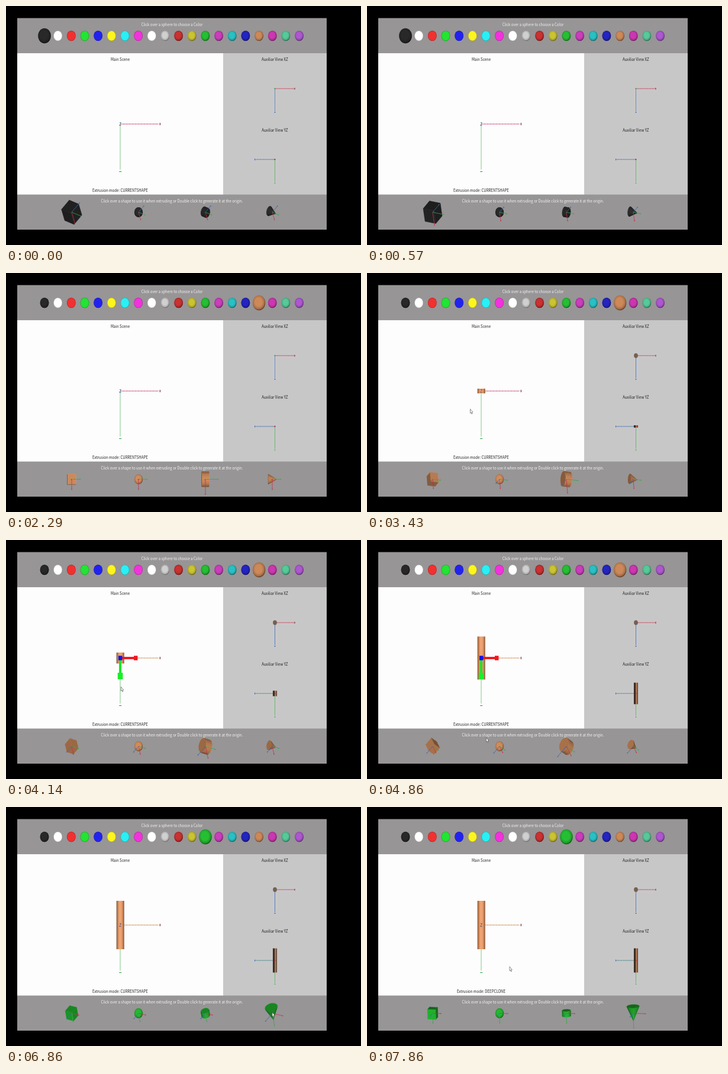
Recreate the animation shown at these times as an HTML page. Size 600x405 px, loop 8 s.

```html
<!DOCTYPE html>
<html lang="en">
<head>
<meta charset="utf-8">
<title>Shape extrusion scene</title>
<style>
html, body { margin: 0; width: 100%; height: 100%; overflow: hidden; background: #000; }
svg { display: block; width: 100vw; height: 100vh; }
text { font: 7.25px "Noto Sans CJK SC", "Noto Sans CJK JP", "Noto Sans CJK", "Noto Sans", sans-serif; text-anchor: middle; }
</style>
</head>
<body>
<svg viewBox="0 0 600 405">
  <defs>
    <radialGradient id="ball" cx=".47" cy=".45" r=".56">
      <stop offset=".5" stop-opacity="0"/>
      <stop offset=".82" stop-opacity=".2"/>
      <stop offset="1" stop-opacity=".65"/>
    </radialGradient>
    <radialGradient id="flat">
      <stop offset=".85" stop-opacity="0"/>
      <stop offset="1" stop-opacity=".35"/>
    </radialGradient>
    <linearGradient id="tube">
      <stop offset="0" stop-color="#6b4a35"/>
      <stop offset=".14" stop-color="#c27a4a"/>
      <stop offset=".38" stop-color="#f0a674"/>
      <stop offset=".65" stop-color="#eaa070"/>
      <stop offset=".87" stop-color="#c07848"/>
      <stop offset="1" stop-color="#6b4a35"/>
    </linearGradient>
    <linearGradient id="side">
      <stop offset="0" stop-color="#2a211b"/>
      <stop offset=".35" stop-color="#4a382c"/>
      <stop offset=".7" stop-color="#c98a60"/>
      <stop offset="1" stop-color="#2a211b"/>
    </linearGradient>
    <pattern id="mesh" width="2" height="2" patternUnits="userSpaceOnUse" patternTransform="skewY(20)">
      <path d="M0 .5H2M.5 0V2" stroke="#000" stroke-width=".45" opacity=".35"/>
    </pattern>
  </defs>
  <g id="backdrop"></g>
  <g id="scene"></g>
</svg>
<script>
const LOOP = 8000, FPS = 7;
const SQUASH = 0.84; // the stage is narrower than the world it shows
const RED = '#c8304c', GREEN = '#35a94a', BLUE = '#3767b4';
const BLACK = 0, LIME = 12, ORANGE = 16;
const SWATCHES = ['#303030', '#ffffff', '#f23030', '#22e432', '#2222f0', '#fcf51e', '#28f0f4', '#f232dc',
  '#ffffff', '#f4f4f4', '#ee3a3a', '#eee63a', '#2ce03c', '#ee48dc', '#30e2e6', '#2a2ae4',
  '#f0a068', '#f040d0', '#66ecb4', '#cc66f4'];
const TINTS = { [BLACK]: [50, 50, 50], [ORANGE]: [244, 164, 108], [LIME]: [40, 218, 56] };

const el = id => document.getElementById(id);
const rect = (x, y, w, h, fill) => `<rect x="${x}" y="${y}" width="${w}" height="${h}" fill="${fill}"/>`;
const line = (x1, y1, x2, y2, stroke, width = 1, dash = '') =>
  `<path d="M${x1} ${y1}L${x2} ${y2}" stroke="${stroke}" stroke-width="${width}" stroke-dasharray="${dash}"/>`;
const oval = (x, y, r, fill) => `<ellipse cx="${x}" cy="${y}" rx="${r * SQUASH}" ry="${r}" fill="${fill}"/>`;
const label = (x, y, str, fill = '#222') =>
  `<text transform="translate(${x} ${y}) scale(${SQUASH} 1)" fill="${fill}">${str}</text>`;

// Last value whose start time has been reached.
const step = (t, list) => list.filter(([at]) => t >= at).pop()[1];

// ---- 3D shapes ----
const RING = Array.from({ length: 20 }, (_, i) => {
  const a = i / 10 * Math.PI;
  return [8.5 * Math.cos(a), 8.5 * Math.sin(a)];
});
const ringAt = y => RING.map(([x, z]) => [x, y, z]);
const strips = (a, b) => a.map((p, i) => {
  const j = (i + 1) % a.length;
  return [p, a[j], b[j], b[i]];
});

function cube() {
  const h = 8.5, faces = [];
  for (let axis = 0; axis < 3; axis++)
    for (const s of [-h, h])
      faces.push([[-h, -h], [h, -h], [h, h], [-h, h]].map(([u, v]) => {
        const p = [u, v];
        p.splice(axis, 0, s);
        return p;
      }));
  return faces;
}
function cylinder() {
  const a = ringAt(-4.8), b = ringAt(4.8);
  return [a, b, ...strips(a, b)];
}
function cone() {
  const base = ringAt(-8), tip = [0, 8.5, 0];
  return [base, ...base.map((p, i) => [p, base[(i + 1) % base.length], tip])];
}
const SHAPES = [[111, cube()], [224, null], [337, cylinder()], [450, cone()]];

// Axes of a frame turned about the screen diagonal (right, down, towards the viewer).
function turned(deg) {
  const a = deg * Math.PI / 180, c = Math.cos(a), s = Math.sin(a) * Math.SQRT1_2;
  return [[(1 + c) / 2, (1 - c) / 2, s], [(1 - c) / 2, (1 + c) / 2, -s], [-s, s, c]];
}

const dot = (a, b) => a[0] * b[0] + a[1] * b[1] + a[2] * b[2];
const sub = (a, b) => a.map((v, i) => v - b[i]);
const cross = (a, b) => [a[1] * b[2] - a[2] * b[1], a[2] * b[0] - a[0] * b[2], a[0] * b[1] - a[1] * b[0]];

function solid(x, faces, axes, size, color) {
  const cy = 349.5;
  const place = p => [0, 1, 2].map(i => size * (p[0] * axes[0][i] + p[1] * axes[1][i] + p[2] * axes[2][i]));
  const screen = p => `${(x + p[0] * SQUASH).toFixed(2)},${(cy + p[1]).toFixed(2)}`;
  const tint = TINTS[color];
  let out = '';
  if (faces) {
    for (const face of faces) {
      const pts = face.map(place);
      const n = cross(sub(pts[1], pts[0]), sub(pts[2], pts[0]));
      const mid = [0, 1, 2].map(i => pts.reduce((sum, p) => sum + p[i], 0) / pts.length);
      const nz = n[2] / Math.hypot(...n) * Math.sign(dot(n, mid));
      if (nz <= 0.001) continue;
      const fill = `rgb(${tint.map(v => Math.round(v * (0.42 + 0.56 * nz)))})`;
      const d = pts.map(screen).join(' ');
      out += `<polygon points="${d}" fill="${fill}" stroke="${fill}" stroke-width=".4"/>` +
        `<polygon points="${d}" fill="url(#mesh)"/>`;
    }
  } else {
    const r = 8.5 * size;
    out += oval(x, cy, r, `rgb(${tint})`) + oval(x, cy, r, 'url(#mesh)') + oval(x, cy, r, 'url(#ball)');
  }
  const colors = [RED, GREEN, BLUE];
  axes.map((a, i) => [a, colors[i]]).sort((p, q) => p[0][2] - q[0][2]).forEach(([a, stroke]) => {
    const ex = x + a[0] * 17 * size * SQUASH, ey = cy + a[1] * 17 * size;
    out += line(x, cy, ex, ey, stroke, 0.8) + oval(ex, ey, 0.9, stroke);
  });
  return out;
}

function palette(chosen) {
  return SWATCHES.map((fill, i) => {
    const x = 65 + 22.66 * i, r = i === chosen ? 12.8 : 8.8;
    const meshed = i > 8 || i === BLACK;
    return oval(x, 50.5, r, fill) + (meshed ? oval(x, 50.5, r, 'url(#mesh)') : '') +
      oval(x, 50.5, r, meshed ? 'url(#ball)' : 'url(#flat)');
  }).join('');
}

function gizmo() {
  return rect(191, 200, 4, 27, '#18e828') + rect(188.8, 225, 8.6, 11, '#18f028') +
    rect(196, 198, 21, 4, '#f01820') + rect(216, 196.2, 6.5, 7.6, '#f01820') +
    rect(190, 196.2, 6.4, 7.6, '#1414e8');
}

function views(t) {
  const made = t >= 2990;
  const half = 4 + 37 * Math.min(1, Math.max(0, (t - 4000) / 980));
  const xColor = t >= 3570 ? '#c4803c' : '#c03468';
  let out = line(193, 200, 258, 200, xColor, 1.1, '2 .5') + rect(259.8, 198, 1.1, 4, '#5a2030') +
    line(193, 200, 193, 277, '#8ccb90', 1.1) + rect(191.2, 280, 4, 1.2, GREEN);
  if (made) out += rect(186.7, 200 - half, 13, half * 2, 'url(#tube)');
  out += t >= 3700 && t < 5140 ? gizmo() : label(193, 202.8, 'Z', '#24407c');

  out += line(454.5, 140, 486.5, 140, RED, 1, '1.8 .7') + rect(487.3, 138.7, 1.2, 2.8, '#842030') +
    line(454.5, 140, 454.5, 178, '#527ebd', 1, made ? '' : '2.2 .6') + rect(453.7, 179.2, 1.6, 1.8, BLUE);
  out += made ? oval(454.5, 140, 4, '#75604f') : oval(454.5, 140, 1.2, GREEN);

  out += line(454.5, 260, 422, 260, t >= 3700 ? '#3d8285' : '#3c6cb0', 1, '2 .6') + rect(420, 258.7, 1.2, 2.8, BLUE) +
    line(454.5, 260, 454.5, 298, '#68b86e') + rect(453.5, 299.4, 2, 1.2, GREEN);
  if (made) out += rect(451, 260 - half / 2, 7, half, 'url(#side)');
  return out + oval(454.5, 260, 1.2, '#b02a34');
}

// time, x, y of the pointer; null hides it
const POINTER = [[0, null], [710, 398, 306], [1140, 340, 349], [1290, 340, 349], [2000, 426, 50],
  [2140, null], [2430, 424, 62], [2860, 339, 349], [3000, 339, 349], [3430, 174.5, 230.5],
  [3710, 193, 201], [4000, 193, 232], [4860, 201.5, 335], [5000, 203, 340], [5710, 333, 73],
  [5860, 338, 51], [6140, 338, 51], [6710, 450, 348], [7000, 450, 348], [7860, 241, 270.5], [8000, 241, 270.5]];

function pointer(t) {
  const i = POINTER.findLastIndex(([at]) => t >= at);
  const a = POINTER[i], b = POINTER[i + 1] || a;
  if (a[1] === null) return '';
  const k = b === a || b[1] === null ? 0 : (t - a[0]) / (b[0] - a[0]);
  const x = a[1] + (b[1] - a[1]) * k || a[1], y = a[2] + (b[2] - a[2]) * k || a[2];
  return `<path transform="translate(${x} ${y})" d="M0 0V7L1.4 5.8L2.5 8.4L3.5 7.9L2.5 5.3H4.3Z" fill="#fff" stroke="#444" stroke-width=".6"/>`;
}

function render(t) {
  const color = step(t, [[0, BLACK], [2000, ORANGE], [6000, LIME]]);
  const picked = step(t, [[0, 0], [1290, 2], [6860, 3]]);
  const mode = step(t, [[0, 'CURRENTSHAPE'], [7290, 'DEEPCLONE']]);
  const axes = turned(241 - 0.028 * t);
  el('scene').innerHTML = palette(color) + views(t) +
    label(193, 314.7, 'Extrusion mode: ' + mode) +
    SHAPES.map(([x, faces], i) => solid(x, faces, axes, i === picked ? 1.5 : 1, color)).join('') +
    pointer(t);
}

el('backdrop').innerHTML = rect(0, 0, 600, 405, '#000') + rect(19, 20.5, 523, 358.5, '#979596') +
  rect(19, 80, 348.5, 239.5, '#fdfdfd') + rect(367.5, 80, 174.5, 239.5, '#c8c7c8') +
  label(280.5, 33.5, 'Click over a sphere to choose a Color', '#f4f4f4') +
  label(193, 93.4, 'Main Scene') +
  label(454.3, 93.4, 'Auxiliar View XZ') +
  label(454.3, 213, 'Auxiliar View YZ') +
  label(280.5, 332.6, 'Click over a shape to use it when extruding or Double click to generate it at the origin.', '#f4f4f4');

let start = null, shown = -1;
function tick(now) {
  if (start === null) start = now;
  const n = Math.floor(((now - start) % LOOP + 6) * FPS / 1000) % (LOOP * FPS / 1000);
  if (n !== shown) {
    shown = n;
    render(Math.round(n * 100 / FPS) * 10);
  }
  requestAnimationFrame(tick);
}
render(0);
requestAnimationFrame(tick);
</script>
</body>
</html>
```
